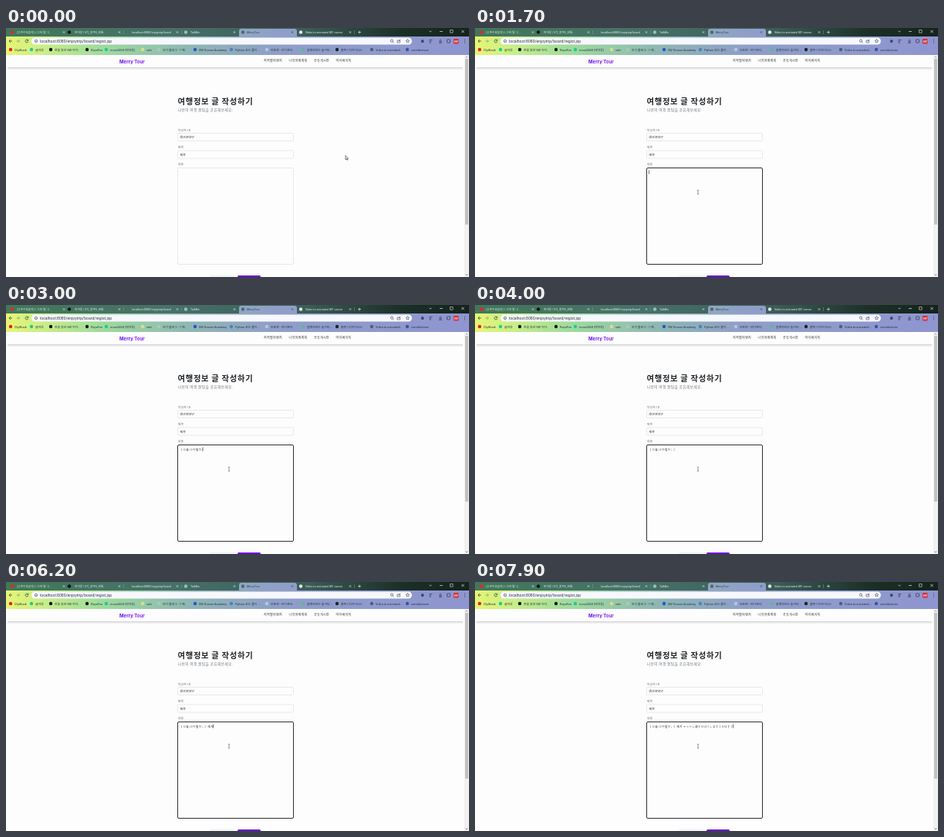
Recreate the animation shown at these times as an HTML page with a canvas. Size 600 by 323 pixels, loop 8000 ms.

```html
<!DOCTYPE html>
<html lang="ko">
<head>
<meta charset="utf-8">
<title>Merry Tour</title>
<style>
html, body { margin: 0; width: 100%; height: 100%; overflow: hidden; background: #fdfdfd; }
canvas { display: block; width: 600px; height: 323px; }
</style>
</head>
<body>
<canvas id="stage" width="600" height="323"></canvas>
<script>
const ctx = document.getElementById('stage').getContext('2d');
const LOOP = 8000;
const STEP = 100;
const KO = '"Noto Sans CJK KR", "Noto Sans CJK", sans-serif';
const UI = 'Roboto, "Noto Sans CJK KR", "Noto Sans CJK", sans-serif';
const PAPER = '#fdfdfd';
const AREA = { x: 222.5, y: 181.5, w: 150, h: 125 };

const TYPED = 'ㅣㅁ놓;ㅁ누림누; ㅣ 새기 ㅜㅇㅇㄴ해ㅑㅁ너ㅣㄴ우ㅑㅣㅁ너ㅑㅣ';
// [time, letters typed]
const PACE = [[1900, 0], [2900, 9], [3300, 9], [3600, 11], [4700, 11], [5000, 13],
  [5600, 13], [5900, 14], [6300, 14], [7800, TYPED.length]];

const TABS = [
  [8, 14, '#e5262b', '(우주수호음악) 🎵 그저 빛! ㅎ..', 75],
  [82, 89, '#111', '박하루 | 5기_광주5_관통..', 147],
  [0, 163, '', 'localhost:8080/enjoytrip/board', 222],
  [233, 239, '#8fc4b2', 'TalkBix', 296],
  [307, 312, '#5c6470', 'MerryTour', 371],
  [382, 388, '#dfe8e6', 'Video to animated GIF conver', 446]
];

const MARKS = [
  [6, '#e8201f', 'ClipNook'], [33, '#20c997', '글마루'], [58, '#111', '한빛 청년 SW 아카..'],
  [105, '#181818', 'RepoFen'], [130, '#20c997', 'moru2468 (박하루)'], [177, '#d8e08a', 'solv'],
  [198, '#a9c9c0', '인기 블로그 - 1 페..'], [245, '#2456c8', 'SW Orvane Academy'],
  [292, '#4b83b5', 'Python 코드 풀이 ...'], [338, '#b9c6dd', '인포란 - 라이프타..'],
  [385, '#58b99a', '함께자라는 놀이터...'], [429, '#222', '홈쪽 | 디자이너스'],
  [474, '#555c78', 'Video to animated...'], [520, '#3956a0', 'contributions']
];

function blend(x0, y0, x1, y1, stops) {
  const g = ctx.createLinearGradient(x0, y0, x1, y1);
  stops.forEach(([at, color]) => g.addColorStop(at, color));
  return g;
}

const STRIP = blend(0, 0, 600, 0, [[0, '#41785a'], [0.35, '#477169'],
  [0.65, '#3b5c58'], [0.85, '#1c3027'], [1, '#14231b']]);
const BAR = blend(0, 0, 600, 0, [[0, '#e6f573'], [0.07, '#cdf086'], [0.2, '#9fdc9c'],
  [0.4, '#8eb6b4'], [0.58, '#8f9fc8'], [1, '#8f95d0']]);

function rect(x, y, w, h, color) {
  ctx.fillStyle = color;
  ctx.fillRect(x, y, w, h);
}

function box(x, y, w, h, r, fill, stroke, width = 1) {
  ctx.beginPath();
  ctx.roundRect(x, y, w, h, r);
  if (fill) { ctx.fillStyle = fill; ctx.fill(); }
  if (stroke) { ctx.strokeStyle = stroke; ctx.lineWidth = width; ctx.stroke(); }
}

function dot(x, y, r, color) {
  ctx.beginPath();
  ctx.arc(x, y, r, 0, Math.PI * 2);
  ctx.fillStyle = color;
  ctx.fill();
}

function line(points, color, width = 0.7) {
  ctx.beginPath();
  points.forEach(([x, y], i) => i ? ctx.lineTo(x, y) : ctx.moveTo(x, y));
  ctx.strokeStyle = color;
  ctx.lineWidth = width;
  ctx.stroke();
}

function ring(x, y, r, color, from = 0, to = Math.PI * 2) {
  ctx.beginPath();
  ctx.arc(x, y, r, from, to);
  ctx.strokeStyle = color;
  ctx.lineWidth = 0.7;
  ctx.stroke();
}

// Page text is set a little open; browser chrome is not.
function text(str, x, y, size, color, weight = 400, family = KO) {
  ctx.font = `${weight} ${size}px ${family}`;
  ctx.letterSpacing = family === KO ? `${size * 0.07}px` : '0px';
  ctx.fillStyle = color;
  ctx.fillText(str, x, y);
  return ctx.measureText(str).width;
}

function cross(x, y, s, color) {
  line([[x - s, y - s], [x + s, y + s]], color);
  line([[x + s, y - s], [x - s, y + s]], color);
}

function drawTabs() {
  rect(0, 0, 600, 11, STRIP);
  box(302, 1, 75, 14, [3, 3, 0, 0], BAR);
  TABS.forEach(([icon, x, color, label, close], i) => {
    const active = i === 4;
    const ink = active ? '#3a4262' : '#e6eee9';
    if (icon) dot(icon, 5.5, 2.2, color);
    ctx.save();
    ctx.beginPath();
    ctx.rect(x, 0, close - x - 4, 11);
    ctx.clip();
    text(label, x, 6.9, 3.7, ink, 400, UI);
    ctx.restore();
    cross(close, 5.5, 1.1, ink);
    if (!active && i !== 3) rect(close + 5, 3, 0.5, 5, '#7f9d92');
  });
  const ink = '#dfe6e2';
  line([[456, 5.5], [460, 5.5]], ink);
  line([[458, 3.5], [458, 7.5]], ink);
  line([[548.5, 3.7], [550, 5.2], [551.5, 3.7]], ink);
  line([[562, 4.5], [566, 4.5]], ink);
  box(575.5, 2.5, 3.6, 3.6, 0, null, ink, 0.6);
  cross(592, 4.5, 1.7, ink);
}

function drawToolbar() {
  const ink = '#2c3348';
  rect(0, 11, 600, 24, BAR);
  line([[8, 17], [4, 17]], ink);
  line([[6, 15], [4, 17], [6, 19]], ink);
  line([[13.5, 17], [17.5, 17]], '#8b9a62');
  line([[15.5, 15], [17.5, 17], [15.5, 19]], '#8b9a62');
  ring(27, 17, 1.9, ink, 0.3, 5.5);
  line([[28.8, 14.8], [28.8, 16.4], [27.2, 16.4]], ink);

  box(33, 12.5, 493, 9, 4.5, '#f7f8fd');
  ring(39, 17, 1.7, '#50586c');
  line([[39, 16.7], [39, 18]], '#50586c', 0.6);
  text('localhost:8080/enjoytrip/board/regist.jsp', 44, 18.7, 5.1, '#33384a', 400, UI);
  ring(500, 16.6, 1.6, '#444b60');
  line([[501.2, 17.8], [502.6, 19.2]], '#444b60');
  box(507, 16, 3.6, 3, 0, null, '#444b60', 0.6);
  line([[508.6, 17.4], [511, 14.8]], '#444b60');
  ctx.beginPath();
  for (let i = 0; i < 10; i++) {
    const a = -Math.PI / 2 + i * Math.PI / 5;
    const r = i % 2 ? 1.1 : 2.5;
    ctx.lineTo(520.5 + r * Math.cos(a), 17 + r * Math.sin(a));
  }
  ctx.closePath();
  ctx.strokeStyle = '#444b60';
  ctx.lineWidth = 0.6;
  ctx.stroke();
  box(538, 15.2, 3.4, 3.8, 1, '#3f4668');
  line([[548.5, 15.5], [552.5, 15.5]], ink);
  line([[548.5, 17.2], [551, 17.2]], ink);
  line([[548.5, 18.9], [551, 18.9]], ink);
  line([[563, 14.5], [563, 18]], ink);
  line([[561, 16.6], [563, 18.4], [565, 16.6]], ink);
  line([[561, 19.3], [565, 19.3]], ink);
  box(571.5, 15, 4, 4, 0.5, null, ink, 0.7);
  box(580, 14, 6.5, 6.5, 1, '#d92d35');
  text('HY', 581, 18.6, 3.6, '#fff', 700, UI);
  for (let i = -1; i < 2; i++) dot(594.5, 17 + i * 2, 0.5, ink);

  MARKS.forEach(([x, color, label]) => {
    dot(x, 28, 2.2, color);
    text(label, x + 5, 29.5, 3.9, '#2b3244', 400, UI);
  });
}

function field(label, y, value) {
  text(label, 222.7, y, 3.85, '#666b72');
  box(222.5, y + 2.8, 150, 10, 1, PAPER, '#e4e5e8', 0.8);
  text(value, 225.5, y + 9.4, 3.9, '#24282d', 500);
}

function drawPage(focused) {
  rect(0, 35, 600, 288, PAPER);
  rect(2, 51, 590, 4, blend(0, 51, 0, 55, [[0, '#cbcbcd'], [0.4, '#ebebec'], [1, PAPER]]));

  const hue = blend(147, 0, 179, 0, [[0, '#6610f2'], [1, '#8c1cf0']]);
  text('Merry Tour', 147, 45.5, 6, hue, 700, 'Inter, sans-serif');
  [[334, '지역별여행지'], [366.5, '나의여행계획'], [399, '공유게시판'], [427.5, '마이페이지']]
    .forEach(([x, label]) => text(label, x, 44.3, 4.05, '#33373c', 500));

  text('여행정보 글 작성하기', 222.5, 98.8, 10.3, '#212529', 700);
  text('나만의 여행 꿀팁을 공유해보세요.', 222.7, 108.4, 4.75, '#747b82');
  field('작성자 ID', 133.7, 'dorimin7');
  field('제목', 156.2, '제목');
  text('내용', 222.7, 178.4, 3.85, '#666b72');
  const { x, y, w, h } = AREA;
  box(x, y, w, h, 1.5, PAPER, focused ? '#2e3033' : '#e0e2e5', focused ? 1 : 0.8);

  box(265, 321, 31, 8, 1.5, '#f5f6f7', '#e8eaec', 0.6);
  box(300, 321, 30, 8, 1.5, '#6f13dc');

  rect(594, 35, 6, 288, '#f1f1f1');
  rect(595, 40, 4, 215, '#c1c1c1');
  line([[595.7, 38.4], [597, 37], [598.3, 38.4]], '#777');
  line([[595.7, 319.5], [597, 321], [598.3, 319.5]], '#555');
}

function typedCount(t) {
  for (let i = 1; i < PACE.length; i++) {
    const [t0, n0] = PACE[i - 1];
    const [t1, n1] = PACE[i];
    if (t <= t1) return Math.floor(n0 + (n1 - n0) * Math.max(0, t - t0) / (t1 - t0));
  }
  return TYPED.length;
}

function drawTyping(t) {
  let str = TYPED.slice(0, typedCount(t));
  if (t < 5400) str = str.replace('새', 'ㅅ');
  const w = text(str, 225.7, 188.7, 3.85, '#1a1c1f', 500);
  const blinkOff = t >= 3700 && t < 4700 && Math.floor((t - 3700) / 500) % 2 === 0;
  if (!blinkOff) rect(225.4 + w, 184.5, 0.6, 5, '#16181b');
}

function drawPointer(t) {
  const p = Math.min(1, Math.max(0, (t - 900) / 500));
  const e = p * p * (3 - 2 * p);
  const x = 440 + (289 - 440) * e;
  const y = 165.5 + (213 - 165.5) * e;
  const inside = x > AREA.x && x < AREA.x + AREA.w && y > AREA.y;
  if (inside) {
    line([[x, y - 2.5], [x, y + 2.5]], '#444', 0.6);
    line([[x - 1.2, y - 2.6], [x + 1.2, y - 2.6]], '#555', 0.5);
    line([[x - 1.2, y + 2.6], [x + 1.2, y + 2.6]], '#555', 0.5);
    return;
  }
  const shape = [[0, 0], [0, 5.2], [1.2, 4.1], [2, 5.9], [2.8, 5.5], [2, 3.8], [3.6, 3.7]];
  ctx.beginPath();
  shape.forEach(([dx, dy]) => ctx.lineTo(x + dx, y + dy));
  ctx.closePath();
  ctx.fillStyle = '#fff';
  ctx.fill();
  ctx.strokeStyle = '#222';
  ctx.lineWidth = 0.6;
  ctx.stroke();
}

function draw(t) {
  const focused = t >= 1500;
  drawTabs();
  drawToolbar();
  drawPage(focused);
  if (focused) drawTyping(t);
  drawPointer(t);
}

const start = performance.now();
function tick() {
  const t = (performance.now() - start) % LOOP;
  draw(Math.floor(t / STEP) * STEP);
  requestAnimationFrame(tick);
}
tick();
</script>
</body>
</html>
```
